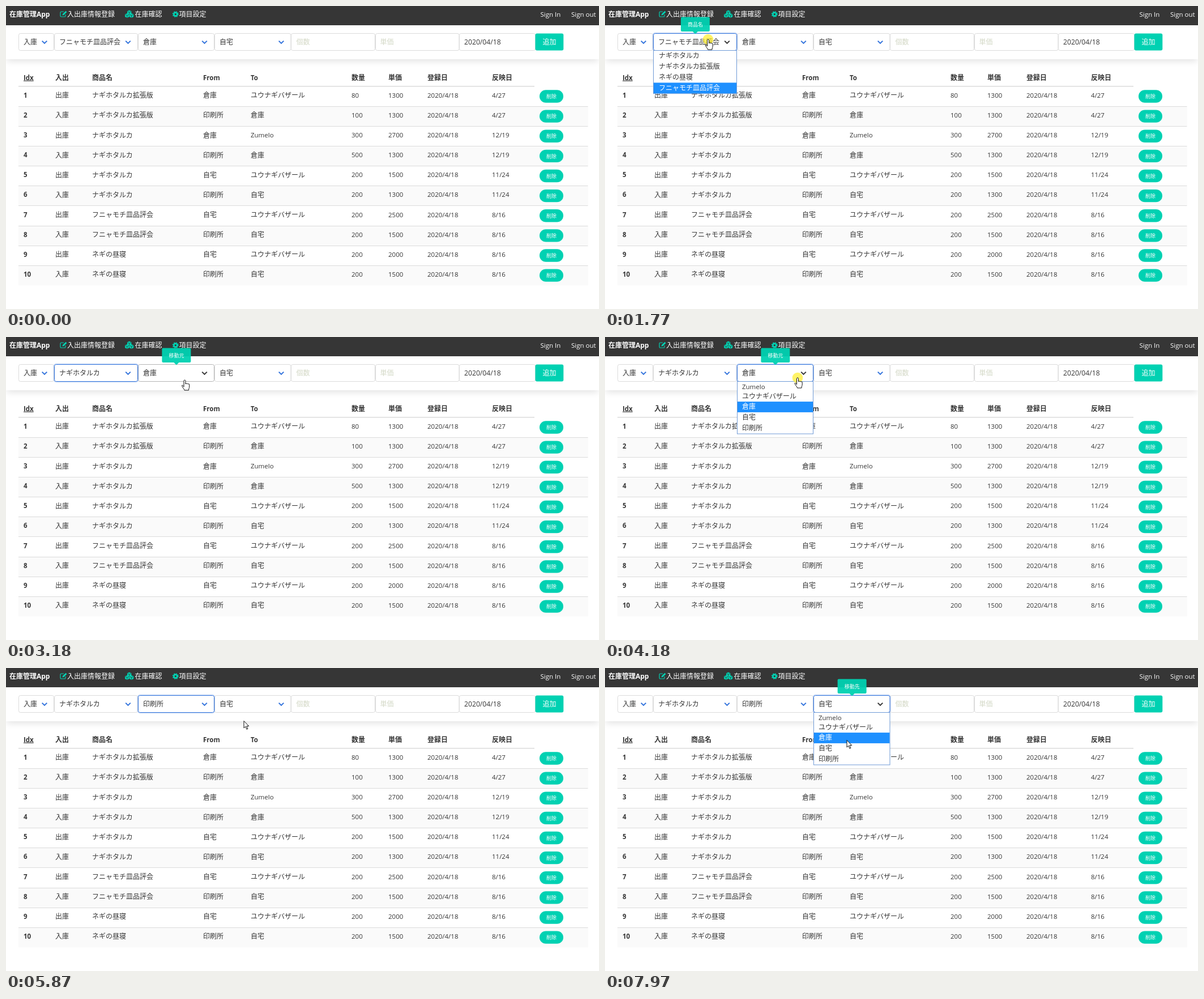
An HTML page that plays this animation: 1047x535 px, repeating every 8000 ms.

```html
<!DOCTYPE html>
<html lang="ja">
<head>
<meta charset="utf-8">
<title>在庫管理</title>
<style>
html, body { margin: 0; width: 100%; height: 100%; overflow: hidden; background: #fff; }
svg { display: block; }
text { font-family: 'Open Sans', 'Noto Sans CJK JP', 'Noto Sans CJK', sans-serif; white-space: pre; }
</style>
</head>
<body>
<svg width="1047" height="535" viewBox="0 0 1047 535">
  <g id="page"></g>
  <g id="live"></g>
</svg>
<script>
const TEAL = '#00d1b2', INK = '#363636', LINE = '#dbdbdb', BLUE = '#3273dc';
const LOOP = 8000, STEP = 77;
const products = ['ナギホタルカ', 'ナギホタルカ拡張版', 'ネギの昼寝', 'フニャモチ皿品評会'];
const places = ['Zumelo', 'ユウナギバザール', '倉庫', '自宅', '印刷所'];

const isAscii = s => /^[\x20-\x7e]+$/.test(s);
const rect = (x, y, w, h, attrs) => `<rect x="${x}" y="${y}" width="${w}" height="${h}" ${attrs}/>`;
const path = (d, attrs) => `<path d="${d}" ${attrs}/>`;

// Text placed by its left (or middle) x and its vertical centre.
function label(x, cy, s, { fill = INK, size, bold, mid, extra = '' } = {}) {
  const latin = isAscii(String(s));
  size = size || (latin ? 11.5 : 12);
  const y = cy + size * (latin ? 0.36 : 0.38);
  return `<text x="${x}" y="${y}" font-size="${size}" fill="${fill}"` +
    `${bold ? ' font-weight="700"' : ''}${mid ? ' text-anchor="middle"' : ''} ${extra}>${s}</text>`;
}

const field = (x, w, stroke = LINE) =>
  rect(x, 48.5, w, 30, `rx="3" fill="#fff" stroke="${stroke}"`);
const chevron = (x, color) =>
  path(`M${x - 4.3} 61.6l4.3 4.3 4.3-4.3`, `fill="none" stroke="${color}" stroke-width="2"`);

function navbar() {
  const white = { fill: '#fff' };
  const cube = (x, y) => path(`M${x} ${y - 4}l3.7 1.8v4.2l-3.7 2-3.7-2v-4.2z`, `fill="${TEAL}"`) +
    path(`M${x - 3} ${y - 1.7}l3 1.4 3-1.4M${x} ${y - 0.3}v4`, `fill="none" stroke="${INK}" stroke-width=".8"`);
  const ring = (r, w, dash) => `<circle cx="299.3" cy="14.6" r="${r}" fill="none" stroke="${TEAL}" stroke-width="${w}" ${dash || ''}/>`;
  return rect(0, 0, 1047, 34, `fill="${INK}"`) +
    label(6, 14.5, '在庫管理App', { fill: '#fff', bold: true }) +
    path('M102 10h-4.5q-1.5 0-1.5 1.5v6q0 1.5 1.5 1.5h6q1.5 0 1.5-1.5v-2.5', `fill="none" stroke="${TEAL}" stroke-width="1.2"`) +
    path('M99.5 16.5l.5-2.5 5.5-5.3 2 2-5.5 5.3z', `fill="${TEAL}"`) +
    label(108, 14.5, '入出庫情報登録', white) +
    cube(217.7, 11.5) + cube(213.8, 17) + cube(221.6, 17) +
    label(227.5, 14.5, '在庫確認', white) +
    ring(3, 2.6) + ring(4.7, 1.6, 'stroke-dasharray="1.846"') +
    label(305.5, 14.5, '項目設定', white) +
    label(943.5, 14.5, 'Sign In', white) + label(998, 14.5, 'Sign out', white);
}

function formBar() {
  const hint = { fill: '#d3d8c6' };
  return rect(1.5, 40, 1044, 58, 'fill="#0a0a0a" opacity=".1" style="filter:blur(6px)"') +
    rect(0, 33, 1047, 61, 'fill="#fff"') +
    field(22.5, 62) + label(31, 63.5, '入庫') + chevron(68, BLUE) +
    field(503.5, 148) + label(512.5, 63.5, '個数', hint) +
    field(652.5, 147.5) + label(660.5, 63.5, '単価', hint) +
    field(800.5, 134) + label(809, 63.5, '2020/04/18', { size: 12.2 }) +
    rect(934.5, 48.5, 49.8, 30, `rx="3" fill="${TEAL}"`) +
    label(959.5, 63.5, '追加', { fill: '#fff', mid: true });
}

function table() {
  const cols = [31, 87, 152, 348, 432, 610, 675, 744, 858];
  const heads = ['Idx', '入出', '商品名', 'From', 'To', '数量', '単価', '登録日', '反映日'];
  // product, from, to, quantity, price, date
  const rows = [
    [1, 2, 1, 80, 1300, '4/27'], [1, 4, 2, 100, 1300, '4/27'],
    [0, 2, 0, 300, 2700, '12/19'], [0, 4, 2, 500, 1300, '12/19'],
    [0, 3, 1, 200, 1500, '11/24'], [0, 4, 3, 200, 1300, '11/24'],
    [3, 3, 1, 200, 2500, '8/16'], [3, 4, 3, 200, 1500, '8/16'],
    [2, 3, 1, 200, 2000, '8/16'], [2, 4, 3, 200, 1500, '8/16']
  ];
  let out = heads.map((h, i) => label(cols[i], 126.5, h, {
    bold: true, extra: i ? '' : 'text-decoration="underline"'
  })).join('');
  out += rect(22, 141, 911, 1.5, `fill="${LINE}"`);
  rows.forEach(([p, from, to, qty, price, date], i) => {
    const dy = i * 35.13, y = 157.7 + dy;
    if (i % 2) out += rect(22, 142 + dy, 1005.5, 35, 'fill="#fafafa"');
    if (i) out += rect(22, Math.round(141.6 + dy), 1005.5, 1, `fill="${LINE}"`);
    const cells = [i + 1, i % 2 ? '入庫' : '出庫', products[p], places[from], places[to], qty, price, '2020/4/18', date];
    cells.forEach((c, k) => { out += label(cols[k], y, c, { bold: !k }); });
    out += rect(942, 148.3 + dy, 42, 22.4, `rx="11.2" fill="${TEAL}"`) +
      label(963, 159.7 + dy, '削除', { fill: '#fff', size: 9, mid: true });
  });
  return out;
}

// Dropdowns: open and close times, the time focus moves away,
// value before and after, and when each row lights up.
const selects = [
  { x: 85.5, w: 147, arrow: 215.5, tip: '商品名', items: products, open: 1770, close: 2780, blur: 4180, was: 3, now: 0,
    lights: [[2160, 0]] },
  { x: 233.5, w: 134, arrow: 350.5, tip: '移動元', items: places, open: 4180, close: 5570, blur: 6500, was: 2, now: 4,
    lights: [[4870, 3], [4950, 4]] },
  { x: 368.5, w: 134.5, arrow: 486, tip: '移動先', items: places, open: 6500, close: LOOP, blur: LOOP, was: 3, now: 3,
    lights: [[7490, 1], [7570, 2]] }
];
const clicks = [1770, 2700, 4180, 5490, 6500, 7890];

// Pointer path: time, x, y
const track = [
  [690, 400, 494], [920, 290, 250], [1140, 206, 66], [1220, 200, 49], [1450, 182, 59],
  [2000, 182, 59], [2153, 175, 84], [2230, 173, 90],
  [2780, 173, 90], [2930, 200, 86], [3090, 290, 77], [3240, 341, 75], [3330, 341, 75], [3480, 340, 72],
  [4640, 340, 72], [4793, 325, 140], [4870, 314, 156], [4950, 310, 161],
  [5110, 310, 161], [5180, 310, 162], [5260, 311, 159],
  [5640, 311, 159], [5870, 420, 93], [5950, 433, 72], [6100, 440, 61],
  [7260, 440, 61], [7490, 430, 122], [7570, 427, 127], [LOOP, 427, 127]
];

// The pointer is sampled about 13 times a second, so it moves in steps.
function pointer(t) {
  const i = track.findIndex(k => k[0] > t);
  if (i < 1) return null;
  const [t0, x0, y0] = track[i - 1], [t1, x1, y1] = track[i];
  const n = Math.max(1, Math.round((t1 - t0) / STEP));
  const f = Math.floor((t - t0) / (t1 - t0) * n) / n;
  return { x: x0 + (x1 - x0) * f, y: y0 + (y1 - y0) * f };
}

const over = (s, p) => p && p.x >= s.x && p.x < s.x + s.w && p.y >= 47 && p.y < 78.5;

function popup(s, t) {
  const lit = s.lights.reduce((row, [at, next]) => t >= at ? next : row, s.was);
  let y = 79, rows = '';
  s.items.forEach((text, i) => {
    const latin = isAscii(text), h = latin ? 16.3 : 18.8;
    if (i === lit) rows += rect(s.x + 0.5, y, s.w - 1, h, 'fill="#1e90ff"');
    rows += label(s.x + (s.items === products ? 9.5 : 8.5), y + h / 2 + (latin ? 0.7 : -0.7), text,
      { fill: i === lit ? '#fff' : INK });
    y += h;
  });
  return rect(s.x, 78.5, s.w, y - 78, 'fill="#fff" stroke="#6f9ad6"') + rows;
}

function tooltip(s) {
  const cx = s.x + s.w / 2 + 0.4;
  return `<g opacity=".95">` + rect(cx - 25.5, 19.5, 51, 25.5, `rx="2" fill="${TEAL}"`) +
    path(`M${cx - 4.5} 45h9l-4.5 4.5z`, `fill="${TEAL}"`) + '</g>' +
    label(cx, 32.6, s.tip, { fill: '#fff', size: 9, mid: true });
}

function cursor(p, hand) {
  const d = hand
    ? 'M-1.5 12V1.5a1.5 1.5 0 0 1 3 0V7c0-1.3 2.2-1.3 2.4 0 .2-1.2 2.2-1 2.3.3 .3-1 2-.8 2 .6V12c0 2-1.2 3-1.2 6H-.5c0-2-4-5.5-4.4-8C-5 8.6-3.2 8.6-1.5 12z'
    : 'M0 .5V13l2.9-2.7 2 4.9 2-.8-2-4.8H8.8z';
  return `<g transform="translate(${p.x} ${p.y})">` +
    path(d, 'fill="#fff" stroke="#111" stroke-linejoin="round"') + '</g>';
}

function scene(t) {
  const p = pointer(t);
  let boxes = '', top = '', hand = false;
  for (const s of selects) {
    const isOpen = t >= s.open && t < s.close;
    const hit = over(s, p), hot = isOpen || hit;
    const focused = t >= s.open && t < s.blur;
    hand = hand || hit;
    const box = field(s.x, s.w, focused ? BLUE : hot ? '#b5b5b5' : LINE) +
      label(s.x + 8.5, 63.5, s.items[t < s.close ? s.was : s.now]) +
      chevron(s.arrow, hot ? INK : BLUE);
    if (focused) top += rect(s.x - 1, 47.5, s.w + 2, 32, `rx="4" fill="none" stroke="${BLUE}" stroke-opacity=".25" stroke-width="1.5"`) + box;
    else boxes += box;
    if (hot) top += tooltip(s);
    if (isOpen) top += popup(s, t);
  }
  if (p) {
    if (clicks.some(c => t >= c && t < c + 80))
      top += `<circle cx="${p.x}" cy="${p.y}" r="9.3" fill="#ffee28" opacity=".7"/>`;
    top += cursor(p, hand);
  }
  return boxes + top;
}

const live = document.getElementById('live');
document.getElementById('page').innerHTML = formBar() + navbar() + table();
let shown = '';
function draw() {
  const next = scene(performance.now() % LOOP);
  if (next !== shown) live.innerHTML = shown = next;
  requestAnimationFrame(draw);
}
draw();
</script>
</body>
</html>
```
